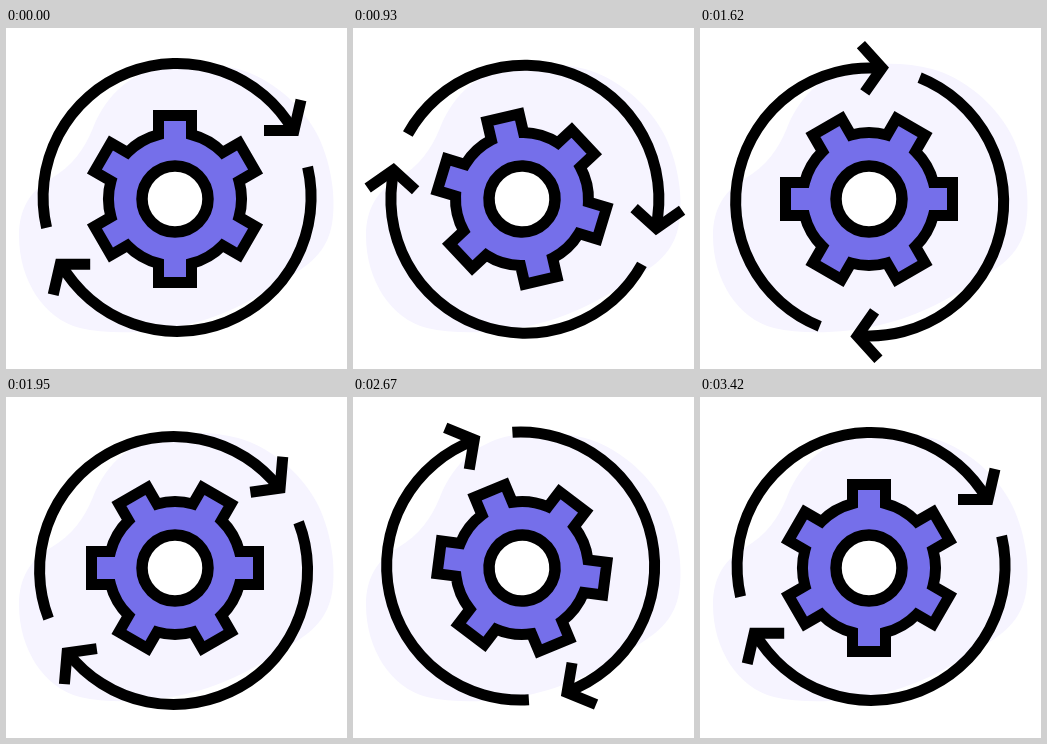
An HTML page for the animation above (3630 ms loop, 341x341 px).

```html
<!DOCTYPE html>
<html lang="en">
<head>
<meta charset="utf-8">
<title>Process gear</title>
<style>
  html, body { margin: 0; width: 100%; height: 100%; overflow: hidden; background: #fff; }
  svg { display: block; width: 100%; height: 100%; }
  .line { fill: none; stroke: #000; stroke-width: 11; stroke-miterlimit: 10; }
</style>
</head>
<body>
<svg viewBox="0 0 341 341">
  <path fill="#f6f4ff" d="M13 208C13 180 25 162 46 150C66 138 78 122 87 100C98 72 118 50 148 41C172 34 206 34 232 41C262 49 294 74 311 106C324 131 331 168 326 196C321 224 304 236 282 250C250 270 222 287 180 297C146 305 104 307 74 300C38 291 13 252 13 208Z"/>
  <g id="ring" class="line"></g>
  <g id="gear">
    <path id="body" class="line" style="fill:#756fea"/>
    <circle cx="169" cy="171" r="33" class="line" style="fill:#fff;stroke-width:11.5"/>
  </g>
</svg>
<script>
const LOOP = 3630, STEP = 30, HOLD = 180, LAST = 108;
const ring = document.getElementById('ring');
const gear = document.getElementById('gear');
const rad = deg => deg * Math.PI / 180;
const clamp = v => Math.min(1, Math.max(0, v));

// Two arrows, half a turn apart
const hub = { x: 171.1, y: 169.4, r: 134 };
const onRing = deg =>
  `${hub.x + hub.r * Math.cos(rad(deg))} ${hub.y + hub.r * Math.sin(rad(deg))}`;
const arrow = `<path d="M${onRing(166.9)}A${hub.r} ${hub.r} 0 0 1 ${onRing(-29.8)}"/>` +
  '<path d="M258 102.6H288L295 72"/>';
ring.innerHTML = arrow + `<g transform="rotate(180 ${hub.x} ${hub.y})">${arrow}</g>`;

// Six square teeth on a round body
function gearPath(cx, cy, root, tip, half) {
  const base = Math.sqrt(root * root - half * half);
  let d = '';
  for (let i = 0; i < 6; i++) {
    const c = Math.cos(rad(i * 60)), s = Math.sin(rad(i * 60));
    const at = (x, y) => `${cx + x * c - y * s} ${cy + x * s + y * c}`;
    d += (i ? `A${root} ${root} 0 0 1 ` : 'M') + at(-half, -base) +
      `L${at(-half, -tip)}L${at(half, -tip)}L${at(half, -base)}`;
  }
  return d + `A${root} ${root} 0 0 1 ${cx - half} ${cy - base}Z`;
}
document.getElementById('body').setAttribute('d', gearPath(169, 171, 66.5, 83.5, 16.5));

const smooth = u => u * u * (3 - 2 * u);

// Cubic easing with handles (x1, 0) and (x2, 1)
function ease(x, x1, x2) {
  let lo = 0, hi = 1;
  for (let i = 0; i < 30; i++) {
    const s = (lo + hi) / 2, q = 1 - s;
    if (3 * x1 * s * q * q + 3 * x2 * s * s * q + s * s * s < x) lo = s;
    else hi = s;
  }
  return smooth((lo + hi) / 2);
}

function draw(t) {
  const n = Math.min(LAST, Math.max(0, Math.floor((t - HOLD) / STEP)));
  const turn = n === LAST ? 0 : 360 * ease(n / LAST, 0.333, 0.835);
  const swing = 90 * (smooth(clamp((n - 7) / 35)) - smooth(clamp((n - 63.5) / 35)));
  ring.setAttribute('transform', `rotate(${turn} 169.2 171.3)`);
  gear.setAttribute('transform', `rotate(${swing} 169 171)`);
}

const start = performance.now();
function tick() {
  draw((performance.now() - start) % LOOP);
  requestAnimationFrame(tick);
}
tick();
</script>
</body>
</html>
```
